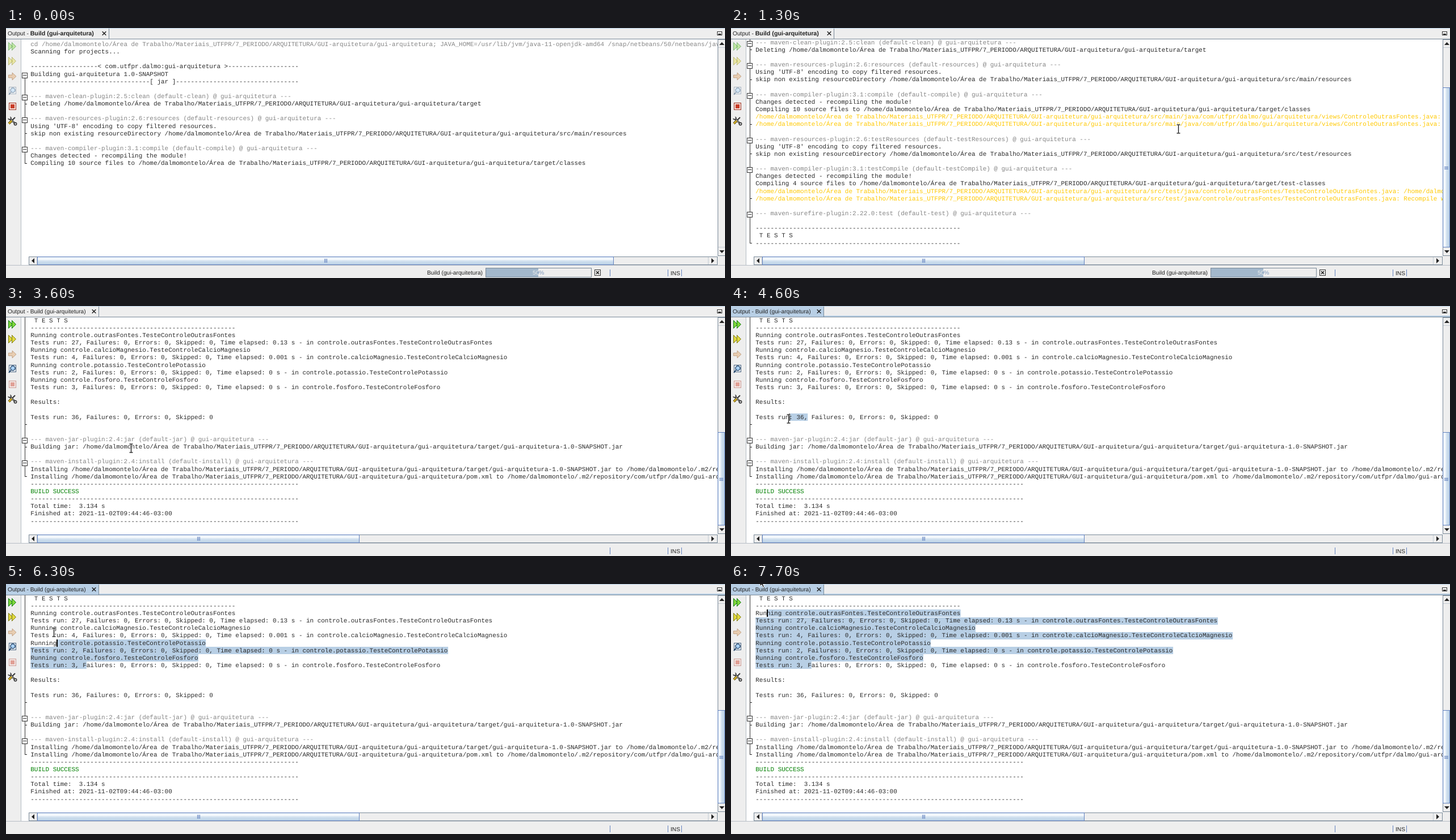
Animation, 1267 px wide and 442 px high, one loop 7900 ms. Source, as an HTML page with a canvas:

```html
<!DOCTYPE html>
<html lang="pt">
<head>
<meta charset="utf-8">
<title>Build output</title>
<style>
html, body { margin: 0; width: 100%; height: 100%; overflow: hidden; background: #eee; }
canvas { display: block; }
</style>
</head>
<body>
<canvas id="stage" width="1267" height="442"></canvas>
<script>
const ctx = document.getElementById('stage').getContext('2d');
const LOOP = 7900, X0 = 43.3, CW = 6.57, LH = 13.14;
const MONO = '10.948px "Liberation Mono", monospace';
const SANS = '10.2px "Liberation Sans", sans-serif';
const BOLD = 'bold 10.7px "Liberation Sans", sans-serif';
const INK = '#2a2a2a', GREY = '#858585', AMBER = '#ffc800', GREEN = '#008000';
const BG = '#eeeeee', EDGE = '#7a8a99', BLUE = '#6382bf', PALE = '#b8cfe5';

// Log text
const app = 'gui-arquitetura', home = '/home/dalmomontelo';
const dir = home + '/Área de Trabalho/Materiais_UTFPR/7_PERIODO/ARQUITETURA/GUI-arquitetura/' + app;
const dash = n => '-'.repeat(n);
const goal = (name, phase) => `--- maven-${name} (default-${phase}) @ ${app} ---`;
const view = dir + '/src/main/java/com/utfpr/dalmo/gui/arquitetura/views/ControleOutrasFontes.java:';
const test = dir + '/src/test/java/controle/outrasFontes/TesteControleOutrasFontes.java: ';
const repo = home + '/.m2/repository/com/utfpr/dalmo/' + app;
const utf = "Using 'UTF-8' encoding to copy filtered resources.";
const skip = 'skip non existing resourceDirectory ' + dir + '/src/';
const changes = 'Changes detected - recompiling the module!';
const suite = (pkg, runs, secs) => {
  const name = `controle.${pkg}.TesteControle${pkg[0].toUpperCase()}${pkg.slice(1)}`;
  return ['Running ' + name,
    `Tests run: ${runs}, Failures: 0, Errors: 0, Skipped: 0, Time elapsed: ${secs} s - in ${name}`];
};
const log = [
  `cd ${dir}; JAVA_HOME=/usr/lib/jvm/java-11-openjdk-amd64 /snap/netbeans/50/netbeans/java/maven/bin/mvn`,
  'Scanning for projects...', '',
  `${dash(18)}< com.utfpr.dalmo:${app} >${dash(19)}`,
  `Building ${app} 1.0-SNAPSHOT`,
  `${dash(32)}[ jar ]${dash(33)}`, '',
  goal('clean-plugin:2.5:clean', 'clean'), `Deleting ${dir}/target`, '',
  goal('resources-plugin:2.6:resources', 'resources'), utf, skip + 'main/resources', '',
  goal('compiler-plugin:3.1:compile', 'compile'), changes,
  `Compiling 10 source files to ${dir}/target/classes`, view, view, '',
  goal('resources-plugin:2.6:testResources', 'testResources'), utf, skip + 'test/resources', '',
  goal('compiler-plugin:3.1:testCompile', 'testCompile'), changes,
  `Compiling 4 source files to ${dir}/target/test-classes`,
  test + dir, test + 'Recompile with -Xlint:unchecked', '',
  goal('surefire-plugin:2.22.0:test', 'test'), '',
  dash(55), ' T E S T S', dash(55),
  ...suite('outrasFontes', 27, '0.13'), ...suite('calcioMagnesio', 4, '0.001'),
  ...suite('potassio', 2, '0'), ...suite('fosforo', 3, '0'),
  '', 'Results:', '', 'Tests run: 36, Failures: 0, Errors: 0, Skipped: 0', '', '',
  goal('jar-plugin:2.4:jar', 'jar'),
  `Building jar: ${dir}/target/${app}-1.0-SNAPSHOT.jar`, '',
  goal('install-plugin:2.4:install', 'install'),
  `Installing ${dir}/target/${app}-1.0-SNAPSHOT.jar to ${repo}`,
  `Installing ${dir}/pom.xml to ${repo}`,
  dash(72), 'BUILD SUCCESS', dash(72),
  'Total time:  3.134 s', 'Finished at: 2021-11-02T09:44:46-03:00', dash(72)
];
const folds = [4, 7, 10, 14, 20, 24, 30, 49, 52];
const ticks = [8, 12, 18, 22, 28, 47, 50, 54];

// Steps: [time, ...values], each held until the next
const lastRow = [[0, 16], [400, 26], [700, 34], [1800, 60]];
const pointer = [
  [0, -50, -50], [700, 960, 6], [800, 900, 50], [900, 825, 130], [1000, 793, 177], [1300, 788, 178],
  [3000, 780, 181], [3100, 752, 190], [3200, 730, 196],
  [3400, 620, 218], [3500, 400, 242], [3600, 220, 251], [3700, 130, 238], [3800, 98, 218],
  [4100, 125, 206], [4200, 139, 199], [4400, 135, 199], [4500, 118, 199], [4600, 101, 199],
  [4900, 162, 188], [5200, 210, 178], [5300, 250, 164], [5400, 232, 156], [5500, 200, 152],
  [5800, 191, 147], [5900, 146, 145], [6000, 138, 140], [6100, 112, 122], [6200, 92, 103],
  [6300, 84, 85], [6400, 82, 70], [6500, 84, 62], [6600, 86, 55],
  [6800, 76, 53], [6900, 64, 52], [7000, 63, 30], [7100, 61, 6],
  [7300, 50, 8], [7400, 40, 6], [7500, 36, 2], [7600, 44, -4], [7700, 51, -9]
];
// Selection: [time, caret row, caret column, anchor row, anchor column]
const marks = [
  [0, -1], [4400, 46, 14, 46, 14], [4500, 46, 12, 46, 14], [4600, 46, 9, 46, 14],
  [5900, 42, 15, 42, 15], [6000, 42, 14, 42, 15], [6100, 41, 10, 42, 15], [6200, 40, 8, 42, 15],
  [6300, 39, 7, 42, 15], [6400, 37, 6, 42, 15], [6500, 36, 6, 42, 15], [6600, 35, 7, 42, 15],
  [6800, 35, 5, 42, 15], [6900, 35, 3, 42, 15]
];
const at = (steps, t) => steps.findLast(s => s[0] <= t).slice(1);

function rect(x, y, w, h, fill) {
  ctx.fillStyle = fill;
  ctx.fillRect(x, y, w, h);
}
function frame(x, y, w, h, color) {
  ctx.strokeStyle = color;
  ctx.lineWidth = 1;
  ctx.strokeRect(x + .5, y + .5, w - 1, h - 1);
}
function text(s, x, y, font, color) {
  ctx.font = font;
  ctx.fillStyle = color;
  ctx.fillText(s, x, y);
}
function poly(points, fill, stroke) {
  ctx.beginPath();
  points.forEach(([x, y]) => ctx.lineTo(x, y));
  ctx.closePath();
  if (fill) { ctx.fillStyle = fill; ctx.fill(); }
  if (stroke) { ctx.strokeStyle = stroke; ctx.lineWidth = 1; ctx.stroke(); }
}
function line(x1, y1, x2, y2, color, width) {
  ctx.strokeStyle = color;
  ctx.lineWidth = width;
  ctx.beginPath();
  ctx.moveTo(x1, y1);
  ctx.lineTo(x2, y2);
  ctx.stroke();
}
function cross(x, y, r, width) {
  line(x - r, y - r, x + r, y + r, '#222', width);
  line(x - r, y + r, x + r, y - r, '#222', width);
}
function clip(x, y, w, h, draw) {
  ctx.save();
  ctx.beginPath();
  ctx.rect(x, y, w, h);
  ctx.clip();
  draw();
  ctx.restore();
}

function header(busy, focused) {
  const end = busy ? 181 : 163;
  rect(0, 0, 1267, 20, BG);
  rect(0, 0, 1267, 1, PALE);
  if (focused) {
    rect(0, 1, end, 18, PALE);
    rect(end, 17, 1267 - end, 2, PALE);
  }
  rect(end, 1, 1, 18, EDGE);
  rect(0, 19, 1267, 1, EDGE);
  text('Output - ', 3, 13, SANS, '#222');
  const x = 3 + ctx.measureText('Output - ').width;
  text(`Build (${app})`, x, 13, busy ? BOLD : SANS, '#222');
  cross(end - 8, 9.5, 3.3, 1.5);
  frame(1253, 6, 9, 7, '#333');
  rect(1255, 10, 5, 2, '#333');
}

function toolbar(busy) {
  rect(0, 20, 26, 399, BG);
  rect(26, 20, 1, 399, '#b4bcc4');
  const dim = off => { ctx.globalAlpha = off ? .42 : 1; };
  const play = (y, fill, edge) => [4.5, 10.5].forEach(x =>
    poly([[x, y - 7], [x + 7, y], [x, y + 7]], fill, edge));
  dim(busy);
  play(32.5, '#7ed63c', '#147a14');
  play(58.5, '#e0d840', '#7c7a10');
  dim(true);
  poly([[4.5, 83], [11, 83], [11, 79], [18, 85.5], [11, 92], [11, 88], [4.5, 88]], '#e0a060', '#8c5a28');
  dim(busy);
  rect(6, 105, 12, 12, '#f6f9fc');
  frame(5, 104, 13, 13, '#46617e');
  ctx.beginPath();
  ctx.arc(12, 110, 4, 0, 7);
  ctx.fillStyle = '#a9d0f4';
  ctx.fill();
  ctx.strokeStyle = '#24466c';
  ctx.lineWidth = 1.5;
  ctx.stroke();
  line(9, 113, 5, 118, '#24466c', 2);
  dim(!busy);
  rect(5, 132, 13, 13, '#f4dcd6');
  frame(5, 132, 13, 13, '#a03828');
  rect(8, 135, 7, 7, '#c83c28');
  dim(false);
  line(7, 160, 16, 169, '#333', 3);
  line(7, 160, 16, 169, '#ddd', 1);
  line(16, 158, 11, 163, '#333', 2);
  line(10, 164, 5, 169, '#554400', 4);
  line(10, 164, 5, 169, '#e8c030', 2);
  ctx.strokeStyle = '#333';
  ctx.lineWidth = 1.5;
  ctx.beginPath();
  ctx.arc(6.5, 159.5, 2.5, -1.2, 3);
  ctx.stroke();
  ctx.beginPath();
  ctx.arc(16.5, 169.5, 2.2, 0, 7);
  ctx.stroke();
}

function lineColor(s) {
  if (s.startsWith('--- ') || s.startsWith('cd ')) return GREY;
  if (s.startsWith('/home')) return AMBER;
  return s === 'BUILD SUCCESS' ? GREEN : INK;
}

function output(last, scroll, mark) {
  rect(27, 20, 1227, 399, '#fff');
  const mid = row => 28.5 + row * LH - scroll;
  const [row, col, anchorRow, anchorCol] = mark;
  clip(27, 20, 1227, 383, () => {
    if (row >= 0) {
      for (let r = row; r <= anchorRow; r++) {
        const from = r === row ? col : 0;
        const to = r === anchorRow ? anchorCol : log[r].length;
        rect(X0 + from * CW, Math.round(mid(r) - 6), (to - from) * CW, 13, PALE);
      }
    }
    for (let r = 0; r <= last; r++) {
      const y = mid(r);
      if (y > 10) text(log[r], X0, y + 3.5, MONO, lineColor(log[r]));
    }
    if (row >= 0) rect(Math.round(X0 + col * CW), Math.round(mid(row) - 6), 2, 13, '#000');

    const foldEnd = Math.min(last, 54), top = mid(4) + 3;
    rect(33, top, 1, mid(foldEnd) - top + 1, '#333');
    [...ticks, foldEnd].forEach(r => {
      if (r <= foldEnd) rect(33, Math.round(mid(r)), 4, 1, '#333');
    });
    folds.forEach(r => {
      if (r > last) return;
      const y = Math.round(mid(r) + 2.7);
      rect(28, y - 5, 10, 10, '#fff');
      frame(28, y - 5, 10, 10, '#333');
      rect(30, y - 1, 6, 1, '#333');
    });
  });
}

function thumb(x, y, w, h, vertical) {
  const g = vertical ? ctx.createLinearGradient(x, 0, x + w, 0) : ctx.createLinearGradient(0, y, 0, y + h);
  g.addColorStop(0, '#d5e3f1');
  g.addColorStop(.3, '#fafcfe');
  g.addColorStop(.55, '#d0e0ef');
  g.addColorStop(1, PALE);
  rect(x, y, w, h, g);
  frame(x, y, w, h, BLUE);
  for (let i = -2; i <= 2; i += 2) {
    if (vertical) rect(x + 3, Math.round(y + h / 2) + i, w - 6, 1, BLUE);
    else rect(Math.round(x + w / 2) + i, y + 4, 1, h - 8, BLUE);
  }
}

function scrollbars(scroll, hEnd) {
  rect(1254, 20, 13, 383, BG);
  frame(1254, 20, 14, 383, EDGE);
  rect(1255, 34, 12, 1, '#c4ccd4');
  rect(1255, 387, 12, 1, '#c4ccd4');
  poly([[1257, 30], [1261.5, 25], [1266, 30]], '#222');
  poly([[1257, 393], [1261.5, 398], [1266, 393]], '#222');
  if (scroll > 0) {
    const h = Math.round(353 * 383 / (383 + scroll));
    thumb(1254, 388 - h, 13, h, true);
  }
  rect(1254, 403, 13, 16, BG);
  rect(40, 404, 1214, 15, BG);
  frame(40, 404, 1214, 15, EDGE);
  rect(54, 405, 1, 13, '#c4ccd4');
  rect(1237, 405, 1, 13, '#c4ccd4');
  poly([[50, 407], [45, 411.5], [50, 416]], '#222');
  poly([[1243, 407], [1248, 411.5], [1243, 416]], '#222');
  thumb(55, 404, hEnd - 54, 15, false);
}

function statusBar(progress) {
  rect(0, 419, 1267, 23, BG);
  rect(0, 419, 1267, 1, '#b8bec6');
  if (progress) {
    text(`Build (${app})`, 742, 436, SANS, '#222');
    rect(846, 425, 92, 15, '#a3b8cc');
    frame(845, 424, 187, 17, EDGE);
    clip(846, 425, 92, 15, () => text('50%', 928, 436, SANS, '#eee'));
    clip(938, 425, 93, 15, () => text('50%', 928, 436, SANS, '#7f98bb'));
    frame(1037, 427, 11, 11, '#333');
    cross(1042.5, 432.5, 2.5, 1.6);
  }
  [1064, 1166, 1190].forEach(x => rect(x, 427, 1, 12, BLUE));
  text('INS', 1171, 437, SANS, '#222');
}

function cursor(x, y) {
  if (y < 20) {
    poly([[x, y], [x, y + 13], [x + 3, y + 10], [x + 5.5, y + 15], [x + 7.5, y + 14],
      [x + 5.5, y + 9.5], [x + 9.5, y + 9.5]], '#111', '#fff');
    return;
  }
  const beam = (color, width) => {
    line(x + .5, y - 6.5, x + .5, y + 7.5, color, width);
    [-7, 8].forEach(d => line(x - 2.5, y + d, x + 3.5, y + d, color, width));
  };
  beam('#fff', 3);
  beam('#111', 1.3);
}

function draw(t) {
  const [last] = at(lastRow, t);
  const busy = t < 1800;
  const scroll = Math.max(0, 28.5 + last * LH - 380);
  ctx.textRendering = 'geometricPrecision';
  header(busy, t >= 4400);
  toolbar(busy);
  output(last, scroll, at(marks, t));
  scrollbars(scroll, t < 400 ? 1070 : 622);
  statusBar(t < 2000);
  cursor(...at(pointer, t));
}

function tick() {
  draw(performance.now() % LOOP);
  requestAnimationFrame(tick);
}
tick();
</script>
</body>
</html>
```
